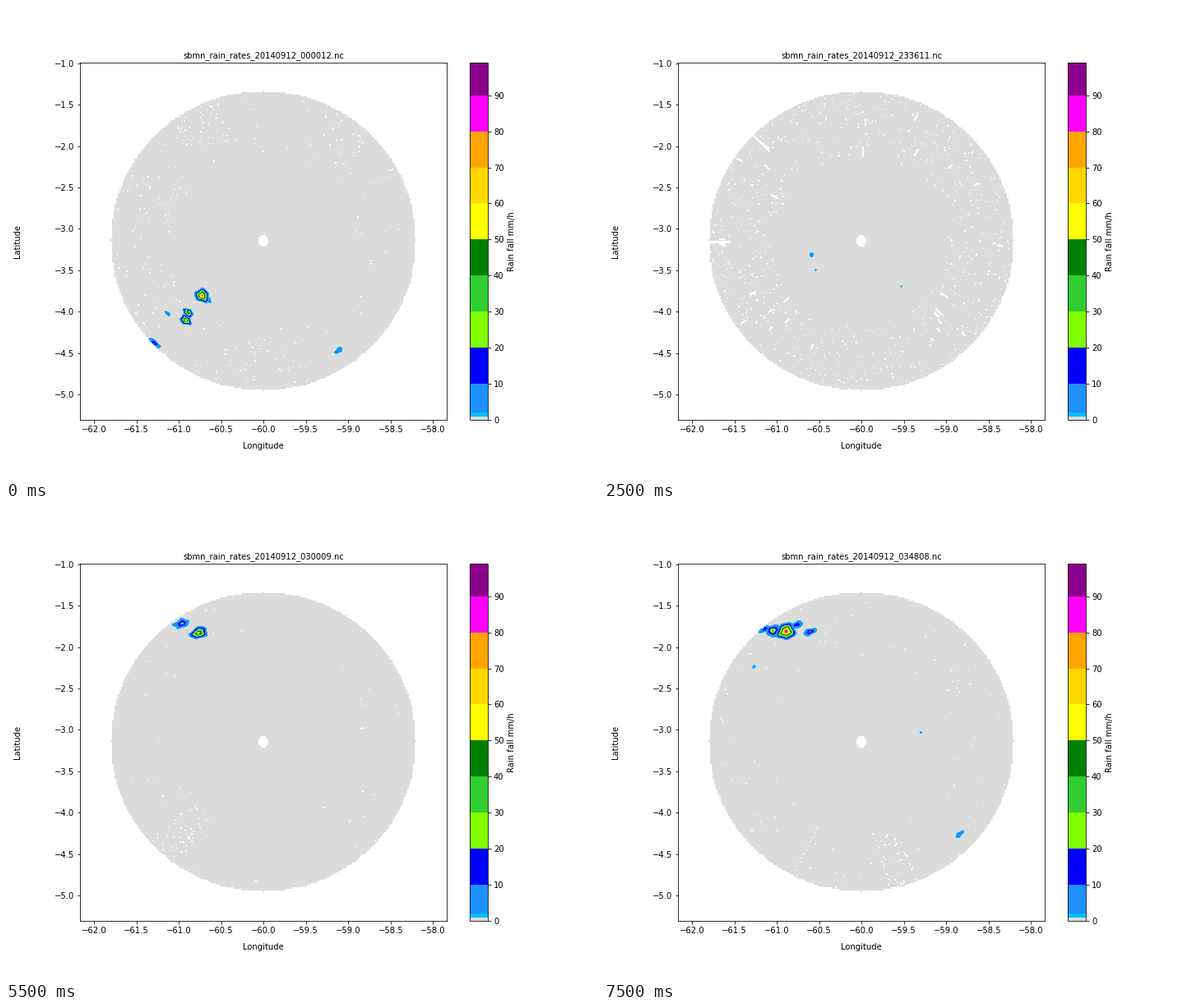
A matplotlib script for the animation above (8 s loop, 720 by 576 pixels).

```python
import numpy as np
import matplotlib.pyplot as plt
from matplotlib.animation import FuncAnimation
from matplotlib.colors import BoundaryNorm, ListedColormap

W, H, DPI = 720, 576, 72
SCANS, STEP_MS = 16, 500

LEVELS = [0, 1, 2, *range(10, 91, 10), 99]
COLORS = ["gainsboro", "deepskyblue", "dodgerblue", "blue", "chartreuse",
          "limegreen", "green", "yellow", "gold", "orange", "fuchsia",
          "darkmagenta"]

# Radar disc in stage pixels
X0, X1, Y0, Y1 = 126, 501, 103, 470
CX, CY, RX, RY = 313.0, 286.4, 186.0, 182.3
PX, PY = np.meshgrid(np.arange(X0, X1) + 0.5, np.arange(Y0, Y1) + 0.5)
DIST2 = (np.round((PX - CX) / RX * 100.4) ** 2
         + np.round((PY - CY) / RY * 100.4) ** 2)
DISC = (DIST2 <= 100 ** 2) & (DIST2 > 12)

SECONDS = [12, 4, 6, 7, 9, 11, 12, 8, 11, 13, 14, 9, 10, 12, 14, 8]
LOOSE = [120, 200, 260, 340, 500, 680, 640, 48, 48, 52, 60, 70, 88, 95, 100,
         115]
SPOKES = {7: -26.5, 9: 14, 12: 243, 15: 243}

# Cells of a single scan: (scan, tilt, [(x, y, half length, half width, peak)])
BRIEF = [
    (0, -38, [(238, 352, 9, 8, 82), (245, 357, 5, 3, 9),
              (221, 373, 7, 4.5, 58), (218, 382, 7.5, 5.5, 62),
              (196, 374, 4.5, 2, 9), (180, 410, 8.5, 3.5, 22)]),
    (0, 35, [(404, 419, 5.5, 3, 9)]),
    (7, 38, [(226, 201, 6, 3.5, 22), (229, 211, 5.5, 4, 68),
             (237, 206, 4.5, 2, 9)]),
    (7, -65, [(142, 352, 8, 4, 26), (148, 350, 8, 4.5, 26),
              (152, 369, 6, 2.2, 9)]),
    (15, 41, [(432, 398, 6.2, 2.8, 9.9), (182, 195, 2.6, 1.8, 4),
              (385, 275, 1.8, 1.4, 4)]),
]

# Faint drifting spots: (scan, x, y, radius)
FAINT = [
    [(2, 243, 297, 2), (3, 246, 299, 1.8), (5, 252, 302.5, 2.7)],
    [(3, 263, 326, 1.8), (5, 257, 321, 1)],
    [(3, 326, 355.5, 3.3), (5, 361, 341, 1.1)],
]

# Moving storms: (scan, x, y, half length, half width, peak)
STORM_TILT = 20
STORMS = [
    [(7, 275, 155, 5, 2.4, 9.9), (9, 244, 153, 8.5, 4, 62),
     (12, 229, 154, 12, 8.5, 62), (15, 221, 152, 11.5, 10, 92)],
    [(7, 255, 153, 2.4, 1.4, 8), (9, 223, 143, 7.5, 2.6, 9.9),
     (12, 209, 142, 9, 7, 34), (15, 205, 151, 9, 7, 34)],
    [(9, 217, 139, 7.5, 2.8, 9.9), (15, 195, 149, 8, 4, 18)],
    [(12, 243, 148, 10, 5, 48), (15, 234, 144, 8, 4, 20)],
    [(12, 271, 153, 10, 3.4, 34), (15, 250, 152.5, 8.5, 4, 24)],
]


def stamp(k):
    """hhmmss: midnight, then 12-minute steps of two periods."""
    if k == 0:
        minutes = 0
    elif k < 7:
        minutes = 22 * 60 + 36 + 12 * k
    else:
        minutes = 2 * 60 + 12 * (k - 6)
    return f"{minutes // 60:02d}{minutes % 60:02d}{SECONDS[k]:02d}"


def title(k):
    return f"sbmn_rain_rates_20140912_{stamp(k)}.nc"


def polar(angle, r):
    a = np.radians(angle)
    return CX + RX * r * np.cos(a), CY - RY * r * np.sin(a)


def punch(grid, x, y, w=1, h=1):
    """Blank a small block given in stage pixels."""
    i, j = int(y) - Y0, int(x) - X0
    if i >= 0 and j >= 0:
        grid[i:i + h, j:j + w] = np.nan


def punch_line(grid, start, end, gap=1):
    span = np.subtract(end, start)
    n = int(np.abs(span).max() / gap) + 1
    for t in np.linspace(0, 1, n):
        punch(grid, *(start + t * span), 2, 2 if gap == 1 else 1)


def sectors(k):
    """Crowded sectors: (angle, half width, inner radius, count)."""
    if k == 0:
        return [(119, 11, .7, 60), (53, 11, .7, 40), (270, 20, .65, 45),
                (180, 40, .6, 70)]
    if k < 7:
        return [(0, 32, .57, 50), (180, 30, .57, 10 * k)]
    angle = np.interp(k, [7, 9, 12, 15], [24, 195, 245, 285])
    return [(angle, 7, .62, 60)]


def add_streaks(grid, k, rng):
    """Radial dashes near the diagonals and bars along the axes."""
    for _ in range(LOOSE[k] // 30):
        a = 45 + 90 * rng.integers(4) + rng.normal(0, 9)
        r = rng.uniform(.6, .95)
        punch_line(grid, polar(a, r), polar(a, r + rng.uniform(.015, .05)))
    reach = 5 * k
    punch_line(grid, (127, 287), (127 + reach, 287))
    for _ in range(k):
        x = rng.choice([rng.uniform(128, 150), rng.uniform(470, 492)])
        y = CY + rng.normal(0, 5)
        punch_line(grid, (x, y), (x + rng.uniform(1, 7), y))
    if k > 3:
        punch_line(grid, (314, 172), (314, 183))
        punch_line(grid, (317, 138), (317, 145))
        punch_line(grid, (181, 158), (200, 177))


def add_specks(grid, k):
    rng = np.random.default_rng(40 + k)
    for angle, half, inner, n in [(0, 180, .57, LOOSE[k])] + sectors(k):
        r = np.sqrt(rng.uniform(inner ** 2, .98, n))
        a = rng.uniform(angle - half, angle + half, n)
        size = rng.choice([1, 2], (n, 2), p=[.55, .45])
        for x, y, (w, h) in zip(*polar(a, r), size):
            punch(grid, x, y, w, h)
    if 0 < k < 7:
        add_streaks(grid, k, rng)
    if k in SPOKES:
        punch_line(grid, polar(SPOKES[k], .65), polar(SPOKES[k], .99), 5)


def pose(track, k):
    """Interpolated values at scan k, or None while absent."""
    times, *values = zip(*track)
    if times[0] <= k <= times[-1]:
        return [np.interp(k, times, v) for v in values]


def cells(k):
    for when, tilt, group in BRIEF:
        if when == k:
            for cell in group:
                yield *cell, tilt
    for track in FAINT:
        spot = pose(track, k)
        if spot:
            x, y, r = spot
            yield x, y, r, r, 7, 0
    for track in STORMS:
        storm = pose(track, k)
        if storm:
            yield *storm, STORM_TILT


def rain(x, y, a, b, peak, tilt):
    t = np.radians(tilt)
    dx, dy = PX - x - 0.5, y + 0.5 - PY
    p = (dx * np.cos(t) + dy * np.sin(t)) / a
    q = (dy * np.cos(t) - dx * np.sin(t)) / b
    th = np.arctan2(q, p)
    d = np.hypot(p, q)
    if a > 4:
        d = d * (1 + .09 * np.sin(3 * th + x) + .07 * np.sin(5 * th + y))
    return 1 + (peak - 1) * np.clip(1.05 - d, 0, 1) ** 1.4


def scan(k):
    grid = np.where(DISC, 0.5, np.nan)
    add_specks(grid, k)
    for cell in cells(k):
        v = rain(*cell)
        wet = DISC & (v > 1.01)
        grid[wet] = np.fmax(grid[wet], v[wet])
    return grid


fig = plt.figure(figsize=(W / DPI, H / DPI), dpi=DPI, facecolor="white")
ax = fig.add_axes([0.125, 0.125, 0.62, 0.755])
LON, LAT = (-62.165, -57.835), (-5.308, -0.992)


def to_lon(px):
    return LON[0] + (px - 90) / 446.4 * (LON[1] - LON[0])


def to_lat(py):
    return LAT[0] + (504 - py) / 434.88 * (LAT[1] - LAT[0])


cmap = ListedColormap(COLORS)
im = ax.imshow(scan(0), cmap=cmap, norm=BoundaryNorm(LEVELS, cmap.N),
               extent=(to_lon(X0), to_lon(X1), to_lat(Y1), to_lat(Y0)),
               interpolation="nearest", aspect="auto")
ax.set(xlim=LON, ylim=LAT, xticks=np.arange(-62, -57.9, .5),
       yticks=np.arange(-5, -0.9, .5))
ax.set_xlabel("Longitude", labelpad=10)
ax.set_ylabel("Latitude", labelpad=40)
heading = ax.set_title(title(0), fontsize=10)

cax = fig.add_axes([564.3 / W, 0.125, 21.75 / W, 0.755])
bar = fig.colorbar(im, cax=cax, spacing="proportional",
                   ticks=range(0, 100, 10))
bar.minorticks_off()
bar.set_label("Rain fall mm/h")


def update(k):
    im.set_data(scan(k))
    heading.set_text(title(k))
    return im, heading


anim = FuncAnimation(fig, update, frames=SCANS, interval=STEP_MS,
                     repeat=True, repeat_delay=0, blit=False)
plt.show()
```
